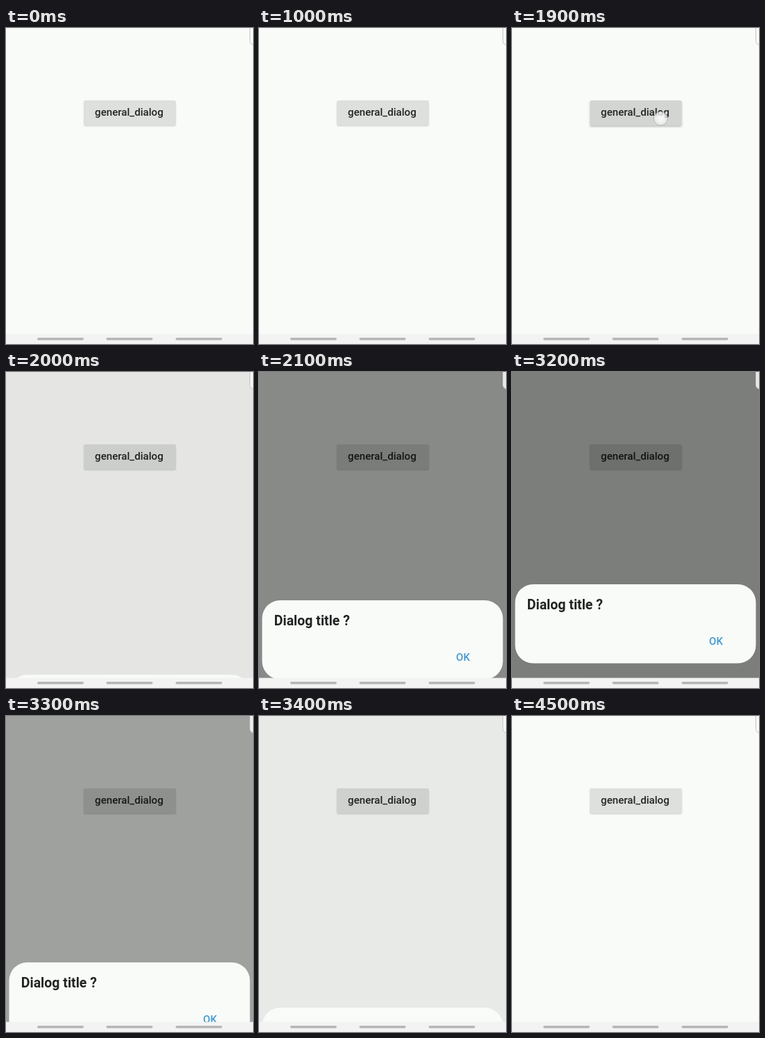
Recreate the animation shown at these times as an HTML page with a canvas. Size 356 px wide and 454 px high, loop 4.8 s.

```html
<!DOCTYPE html>
<html lang="en">
<head>
<meta charset="utf-8">
<title>Bottom dialog</title>
<style>
  html, body { margin: 0; width: 100%; height: 100%; overflow: hidden; background: #f9fbf8; }
  canvas { display: block; width: 356px; height: 454px; }
</style>
</head>
<body>
<canvas id="stage"></canvas>
<script>
const W = 356, H = 454, LOOP = 4800, STEP = 100;
const NAV_TOP = 439.5, SLIDE = 154;
const PAPER = '#f9fbf8';
const canvas = document.getElementById('stage');
const ctx = canvas.getContext('2d');
const dpr = window.devicePixelRatio || 1;
canvas.width = W * dpr;
canvas.height = H * dpr;

// Smooth 0..1 ramp that starts at `start` and lasts `length` ms
function ramp(t, start, length) {
  const u = Math.min(1, Math.max(0, (t - start) / length));
  return u * u * (3 - 2 * u);
}

function box(x, y, w, h, r, color) {
  ctx.beginPath();
  ctx.roundRect(x, y, w, h, r);
  ctx.fillStyle = color;
  ctx.fill();
}

function label(text, x, y, size, weight, color) {
  ctx.font = `${weight} ${size}px Roboto, sans-serif`;
  ctx.fillStyle = color;
  ctx.fillText(text, x, y);
}

function drawButton(pressed) {
  ctx.save();
  ctx.shadowColor = `rgba(0, 0, 0, ${pressed ? 0.22 : 0.18})`;
  ctx.shadowBlur = (pressed ? 3 : 2) * dpr;
  ctx.shadowOffsetY = (pressed ? 2 : 1) * dpr;
  box(112.4, 104, 132.2, 36, 2, pressed ? '#d3d5d2' : '#dee0dd');
  ctx.restore();
  label('general_dialog', 128.1, 126.4, 15.1, 500, '#222423');
}

function drawDialog(offset) {
  ctx.save();
  ctx.translate(0, offset);
  box(4.5, 300, 347, 113.5, 26, PAPER);
  label('Dialog title ?', 21.8, 336, 19.5, 700, '#222423');
  label('OK', 284, 387.2, 15.1, 500, '#4299d2');
  ctx.restore();
}

function drawTouch(x, y) {
  ctx.beginPath();
  ctx.arc(x, y, 10, 0, Math.PI * 2);
  const glow = ctx.createRadialGradient(x, y, 3, x, y, 10);
  glow.addColorStop(0, 'rgba(252, 252, 252, 0.85)');
  glow.addColorStop(1, 'rgba(236, 236, 236, 0.7)');
  ctx.fillStyle = glow;
  ctx.fill();
  ctx.lineWidth = 1;
  ctx.strokeStyle = 'rgba(140, 140, 140, 0.45)';
  ctx.stroke();
}

function drawSystemBars() {
  ctx.fillStyle = '#f2f3f2';
  ctx.fillRect(0, NAV_TOP, W, H - NAV_TOP);
  for (const x of [45, 144.5, 244.5]) box(x, 445, 67, 3.4, 1.7, '#b5b6b5');

  // Side panel handle at the top right corner
  box(351.5, -20, 20, 44.5, 6, 'rgba(249, 251, 248, 0.85)');
  ctx.lineWidth = 1;
  ctx.strokeStyle = '#c3c5c3';
  ctx.stroke();
}

function draw(t) {
  ctx.setTransform(dpr, 0, 0, dpr, 0, 0);
  ctx.fillStyle = PAPER;
  ctx.fillRect(0, 0, W, H);

  const pressed = t >= 1800 && t < 2000;
  drawButton(pressed);
  if (pressed) drawTouch(214.3, 130);

  const shade = 0.5 * (ramp(t, 1954, 180) - ramp(t, 3222, 230));
  ctx.fillStyle = `rgba(0, 3, 0, ${shade})`;
  ctx.fillRect(0, 0, W, H);

  const shown = ramp(t, 1957, 197) - ramp(t, 3164, 341);
  if (shown > 0) drawDialog(Math.round(SLIDE * (1 - shown)));
  if (t >= 3100 && t < 3200) drawTouch(295, 384);

  drawSystemBars();
}

const start = performance.now();
function tick() {
  const t = (performance.now() - start) % LOOP;
  draw(Math.floor(t / STEP) * STEP);
  requestAnimationFrame(tick);
}
tick();
</script>
</body>
</html>
```
